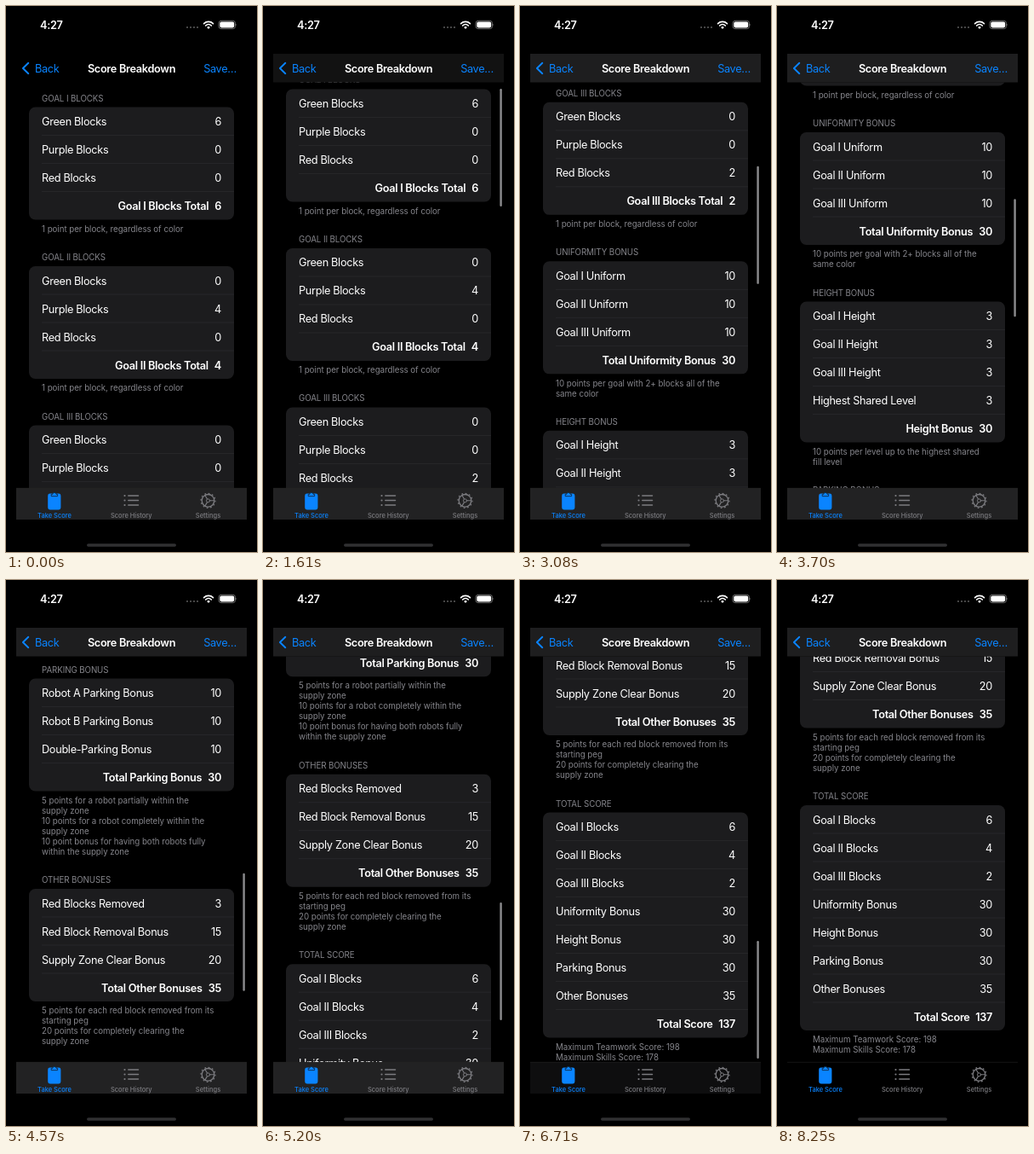
These frames come from a looping animation (295 by 640 pixels, 8310 ms). An HTML page:

```html
<!DOCTYPE html>
<html lang="en">
<head>
<meta charset="utf-8">
<title>Score Breakdown</title>
<style>
  html, body { margin: 0; width: 100%; height: 100%; overflow: hidden; background: #000; }
  svg { display: block; font-family: Inter, Roboto, sans-serif; fill: #fff; }
  .body, .bold { font-size: 12.75px; letter-spacing: -.33px; }
  .bold { font-weight: 600; }
  .note, .head { font-size: 9.75px; letter-spacing: -.04px; fill: #85858b; }
  .head { letter-spacing: -.1px; }
  .tab { font-size: 7.5px; font-weight: 500; text-anchor: middle; fill: #7c7c80; }
  .end { text-anchor: end; }
  .mid { text-anchor: middle; }
  .blue { fill: #0a84ff; }
  .line { fill: none; stroke-linecap: round; stroke-linejoin: round; }
  .gray { stroke: #7c7c80; }
</style>
</head>
<body>
<svg width="295" height="640" viewBox="0 0 295 640">
  <clipPath id="view"><rect y="89.5" width="295" height="475.5"/></clipPath>
  <g clip-path="url(#view)"><g id="list"></g></g>
  <rect id="thumb" x="278.4" width="2.4" height="138" rx="1.2" fill="#8c8c8e"/>
  <rect id="nav" x="12" y="56" width="271" height="33.5" fill="#1e1e1f"/>
  <rect id="bar" x="12" y="565" width="271" height="37" fill="#222223"/>
  <path d="M12 565.3H283" stroke="#222" stroke-width=".6"/>

  <!-- status bar -->
  <text class="bold" x="40" y="26.5">4:27</text>
  <path class="line" d="M213 25h.01M217 25h.01M221 25h.01M225 25h.01" stroke="#555" stroke-width="2.2"/>
  <path class="line" d="M232.6 20.6a7.8 7.8 0 0 1 10.8 0M234.7 23a4.8 4.8 0 0 1 6.6 0" stroke="#fff" stroke-width="1.7"/>
  <path d="M238 26.9l-1.9-2a2.7 2.7 0 0 1 3.8 0z"/>
  <rect x="250" y="17.3" width="19.5" height="9.4" rx="3" fill="none" stroke="#888" stroke-width=".8"/>
  <rect x="251.3" y="18.6" width="16.9" height="6.8" rx="1.8"/>
  <path d="M270.4 20.5q1.4 1.5 0 3z" fill="#777"/>

  <!-- navigation bar -->
  <path class="line" d="M26.3 66.8L19.9 73l6.4 6.2" stroke="#0a84ff" stroke-width="1.9"/>
  <text class="body blue" x="34" y="77.5">Back</text>
  <text class="bold mid" x="147.5" y="77.5">Score Breakdown</text>
  <text class="body blue end" x="271" y="77.5">Save…</text>

  <!-- tab bar -->
  <rect class="blue" x="49.2" y="571.5" width="15.2" height="19" rx="2.4"/>
  <path d="M53.2 574.6v-2.2h1.6a2.1 2.1 0 0 1 4.2 0h1.6v2.2z" fill="#0a84ff" stroke="#123" stroke-width=".8"/>
  <g class="line gray">
    <path d="M139.5 574h.01M139.5 579.5h.01M139.5 585h.01" stroke-width="2.2"/>
    <path d="M143.8 574H155.5M143.8 579.5H155.5M143.8 585H155.5" stroke-width="1.5"/>
    <circle cx="237.5" cy="579.8" r="7.3" stroke-width="1.3"/>
    <circle cx="237.5" cy="579.8" r="8.5" stroke-width="1.2" stroke-dasharray="1.7 2.751" stroke-linecap="butt"/>
    <circle cx="237.5" cy="579.8" r="2" stroke-width="1"/>
    <path d="M239.5 579.8H244.5M236.5 578l-2.5-4.3M236.5 581.6l-2.5 4.3" stroke-width="1.1"/>
  </g>
  <text class="tab blue" x="57" y="599.5">Take Score</text>
  <text class="tab" x="147.3" y="599.5">Score History</text>
  <text class="tab" x="237.5" y="599.5">Settings</text>

  <rect x="95" y="630.2" width="105" height="3.6" rx="1.8" fill="#303032"/>
</svg>
<script>
const LOOP = 8310, ROW = 33, END = 1313;
const perBlock = ["1 point per block, regardless of color"];

// title, rows (the last one is the total), notes
const sections = [
  ["GOAL I BLOCKS", ["Green Blocks 6", "Purple Blocks 0", "Red Blocks 0", "Goal I Blocks Total 6"], perBlock],
  ["GOAL II BLOCKS", ["Green Blocks 0", "Purple Blocks 4", "Red Blocks 0", "Goal II Blocks Total 4"], perBlock],
  ["GOAL III BLOCKS", ["Green Blocks 0", "Purple Blocks 0", "Red Blocks 2", "Goal III Blocks Total 2"], perBlock],
  ["UNIFORMITY BONUS",
    ["Goal I Uniform 10", "Goal II Uniform 10", "Goal III Uniform 10", "Total Uniformity Bonus 30"],
    ["10 points per goal with 2+ blocks all of the", "same color"]],
  ["HEIGHT BONUS",
    ["Goal I Height 3", "Goal II Height 3", "Goal III Height 3", "Highest Shared Level 3", "Height Bonus 30"],
    ["10 points per level up to the highest shared", "fill level"]],
  ["PARKING BONUS",
    ["Robot A Parking Bonus 10", "Robot B Parking Bonus 10", "Double-Parking Bonus 10", "Total Parking Bonus 30"],
    ["5 points for a robot partially within the", "supply zone",
     "10 points for a robot completely within the", "supply zone",
     "10 point bonus for having both robots fully", "within the supply zone"]],
  ["OTHER BONUSES",
    ["Red Blocks Removed 3", "Red Block Removal Bonus 15", "Supply Zone Clear Bonus 20", "Total Other Bonuses 35"],
    ["5 points for each red block removed from its", "starting peg",
     "20 points for completely clearing the", "supply zone"]],
  ["TOTAL SCORE",
    ["Goal I Blocks 6", "Goal II Blocks 4", "Goal III Blocks 2", "Uniformity Bonus 30", "Height Bonus 30",
     "Parking Bonus 30", "Other Bonuses 35", "Total Score 137"],
    ["Maximum Teamwork Score: 198", "Maximum Skills Score: 178"]]
];

const text = (cls, x, y, s) => `<text class="${cls}" x="${x}" y="${y}">${s}</text>`;

function buildList() {
  let out = "", top = 118.5;
  for (const [title, rows, notes] of sections) {
    const height = rows.length * ROW;
    out += text("head", 42, top - 7, title);
    out += `<rect x="27" y="${top}" width="241" height="${height}" rx="7.5" fill="#1c1c1e"/>`;
    rows.forEach((row, i) => {
      const y = top + i * ROW, base = y + 21.5;
      const [, label, value] = row.match(/(.*) (\d+)$/);
      if (i) out += `<path d="M42 ${y}H268" stroke="#2b2b2e" stroke-width=".7"/>`;
      out += i == rows.length - 1
        ? text("bold end", 253, base, `${label}<tspan dx="7">${value}</tspan>`)
        : text("body", 42, base, label) + text("body end", 253, base, value);
    });
    notes.forEach((s, i) => out += text("note", 42, top + height + 14.3 + i * 12, s));
    top += height + 42.5 + notes.length * 12;
  }
  return out;
}

// swipes: first step, last step, step count, scroll reached, sharpness
const swipes = [
  [1610, 2140, 6, 183.3, 3],
  [2290, 3190, 9, 378.9, 4],
  [3370, 4150, 8, 643.5, 2.5],
  [4270, 5200, 10, 1126.8, 6],
  [5450, 6250, 8, 1251.7, 3],
  [6370, 6930, 6, END, 3]
];

const clamp = v => Math.max(0, Math.min(1, v));

// progress 0..1 in n jumps, the first at a, the last at b
const stepped = (t, a, b, n) =>
  t < a ? 0 : clamp((Math.floor((t - a) / (b - a) * (n - 1) + .15) + 1) / n);

function scrollAt(t) {
  let pos = 0;
  for (const [a, b, n, to, sharp] of swipes) {
    const p = stepped(t, a, b, n);
    pos += (to - pos) * (1 - (1 - p ** 1.8) ** sharp);
    if (p < 1) break;
  }
  return pos;
}

const [list, thumb, nav, bar] = ["list", "thumb", "nav", "bar"].map(id => document.getElementById(id));
list.innerHTML = buildList();

function draw(now) {
  const t = now % LOOP, pos = scrollAt(t);
  list.setAttribute("transform", `translate(0 ${-pos})`);
  thumb.setAttribute("y", 91.7 + pos * .254);
  thumb.setAttribute("opacity", t < 1610 ? 0 : 1 - stepped(t, 8000, 8250, 3));
  nav.setAttribute("opacity", clamp(pos / 35));
  bar.setAttribute("opacity", clamp((END - pos) / 20));
}

const start = performance.now();
function tick() {
  draw(performance.now() - start);
  requestAnimationFrame(tick);
}
tick();
</script>
</body>
</html>
```
